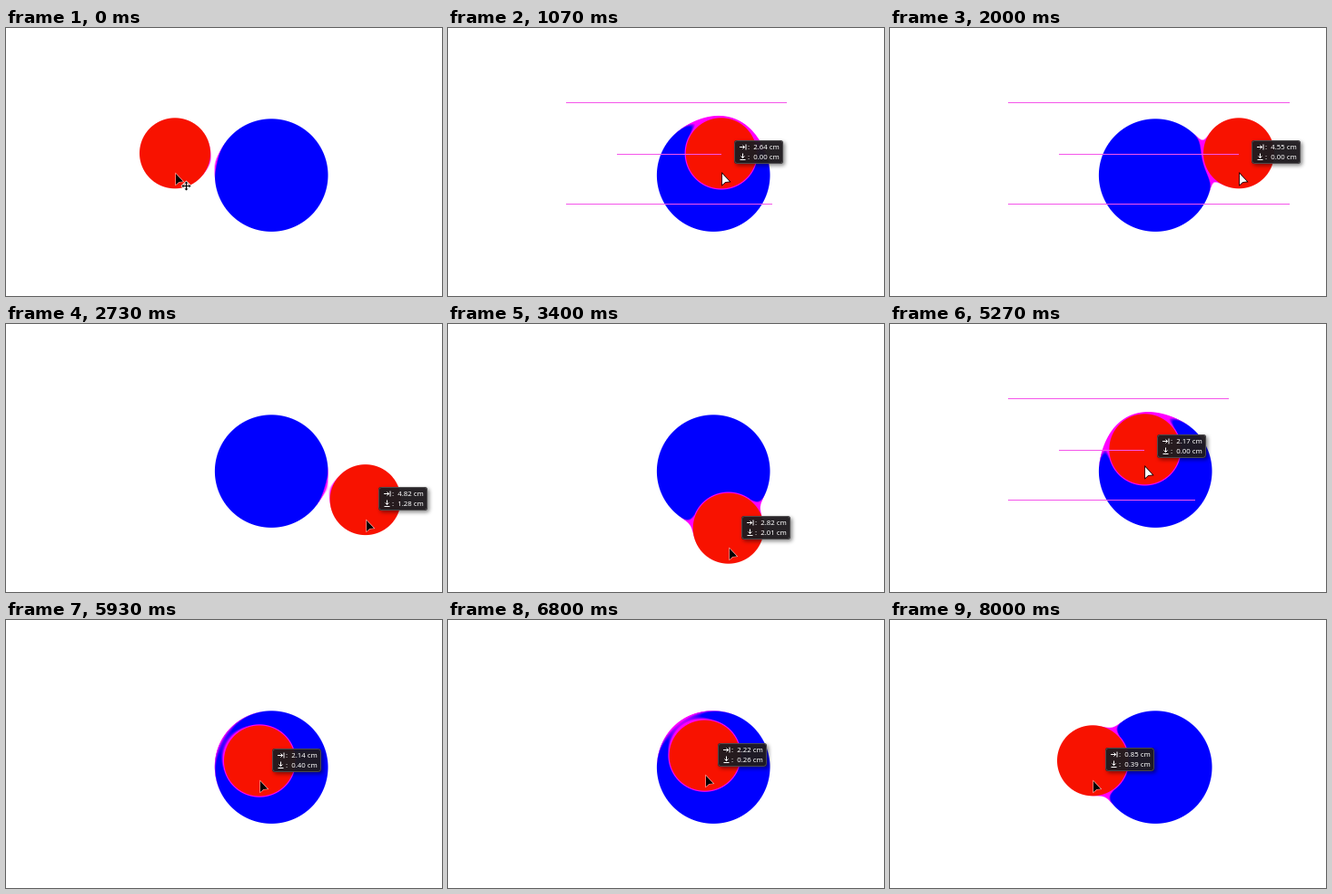
Animation of 480 by 296 pixels, one loop 8070 ms. Source, as an HTML page with a canvas:

```html
<!DOCTYPE html>
<html>
<head>
<meta charset="utf-8">
<style>
html, body { margin: 0; width: 480px; height: 296px; overflow: hidden; background: #fff; }
canvas { display: block; }
</style>
</head>
<body>
<canvas id="stage" width="480" height="296"></canvas>
<script>
const W = 480, H = 296, LOOP = 8070, STEPS = 121;
const ctx = document.getElementById('stage').getContext('2d');
const image = ctx.createImageData(W, H);

const WHITE = [255, 255, 255], BLUE = [0, 0, 255], RED = [248, 18, 0], MAGENTA = [255, 0, 255];
const HOME = { x: 186, y: 138.3, r: 39 };
const BALL = { x: 292.2, y: 162.6, r: 62.3 };
const PX_PER_CM = 43.5;
const EDGE = 56; // half size of the dragged layer, glow included

// key points of the drag: step, x, y
const PATH = [
  [0, 186, 138.3], [8, 240, 138.3], [30, 384, 138.3], [40, 397, 190],
  [51, 308.7, 225.7], [58, 240, 212], [64, 229.1, 165], [73, 246, 104],
  [79, 280.4, 135.5], [87, 286, 165], [91, 272, 146], [96, 272, 146],
  [102, 282.6, 149.6], [106, 288, 151], [120, 223, 155.3]
];

function slope(i, axis) {
  const a = PATH[i], b = PATH[i + 1];
  return a && b ? (b[axis] - a[axis]) / (b[0] - a[0]) : 0;
}

function tangent(i, axis) {
  const a = slope(i - 1, axis), b = slope(i, axis);
  return a * b <= 0 ? 0 : 2 * a * b / (a + b);
}

// monotone cubic through the key points
function along(step, axis) {
  let i = 0;
  while (i < PATH.length - 2 && PATH[i + 1][0] <= step) i++;
  const a = PATH[i], b = PATH[i + 1], span = b[0] - a[0];
  const u = (step - a[0]) / span, v = 1 - u;
  return a[axis] * v * v * (1 + 2 * u) + b[axis] * u * u * (3 - 2 * u) +
    span * (tangent(i, axis) * u * v * v - tangent(i + 1, axis) * u * u * v);
}

const clamp = v => Math.min(1, Math.max(0, v));
const cover = distance => clamp(.5 - distance);
const near = (a, b, reach) => Math.abs(a - b) < reach;

// two discs with a gooey bridge where their halos add up
function drawBalls(cx, cy) {
  for (let y = 0, n = 0; y < H; y++) {
    for (let x = 0; x < W; x++, n += 4) {
      const a = Math.hypot(x + .5 - cx, y + .5 - cy) - HOME.r;
      const b = Math.hypot(x + .5 - BALL.x, y + .5 - BALL.y) - BALL.r;
      const glow = Math.exp(-Math.max(a, 0) / 5) + Math.exp(-(b < 0 ? -.6 * b : b) / 5);
      const bridge = a < 16 ? clamp((glow - 1.09) * 5 + .5) : 0;
      const goo = Math.max(bridge, cover(a - 1.2) * cover(b));
      const blue = cover(b), red = cover(a);
      for (let c = 0; c < 3; c++) {
        let v = WHITE[c] + (BLUE[c] - WHITE[c]) * blue;
        v += (MAGENTA[c] - v) * goo;
        image.data[n + c] = v + (RED[c] - v) * red;
      }
      image.data[n + 3] = 255;
    }
  }
  ctx.putImageData(image, 0, 0);
}

function row(x1, x2, y) {
  ctx.fillStyle = '#f455ea';
  ctx.fillRect(x1, y, Math.round(x2 - x1), 1);
}

function column(x, y1, y2) {
  ctx.fillStyle = '#f455ea';
  ctx.fillRect(x, y1, 1, y2 - y1);
}

function drawGuides(x, y, level) {
  if (level) {
    row(HOME.x - EDGE, Math.max(373, x + EDGE), 82);
    row(HOME.x, x, 139);
    row(HOME.x - EDGE, x + EDGE, 194);
  }
  if (near(x, W / 2, 1.2)) column(W / 2, 0, H);
  if (near(x, BALL.x, 1.2)) column(292, 82, 243);
  if (near(y, H / 2, 1.2)) row(0, W, H / 2);
}

function shape(points, fill, stroke, width) {
  ctx.beginPath();
  points.forEach(([x, y]) => ctx.lineTo(x, y));
  ctx.closePath();
  ctx.lineWidth = width;
  ctx.strokeStyle = stroke;
  ctx.stroke();
  ctx.fillStyle = fill;
  ctx.fill();
}

function drawCursor(x, y, snapped, idle) {
  ctx.save();
  ctx.translate(Math.round(x), Math.round(y));
  const arrow = [[0, 0], [0, 12], [3.4, 9], [8, 8.6]];
  if (snapped) shape(arrow, '#fff', '#000', 1.5);
  else shape(arrow, '#000', 'rgba(255,255,255,.7)', 1.2);
  if (idle) {
    ctx.translate(11.5, 13.5);
    const arm = [[-.6, -.6], [-.6, -3], [-2, -3], [0, -5], [2, -3], [.6, -3]];
    const turn = ([x, y], k) => k ? turn([-y, x], k - 1) : [x, y];
    shape([0, 1, 2, 3].flatMap(k => arm.map(p => turn(p, k))), '#000', '#fff', 1.4);
  }
  ctx.restore();
}

function drawReadout(x, y, dx, dy) {
  ctx.save();
  ctx.translate(Math.round(x), Math.round(y));
  ctx.shadowColor = 'rgba(0,0,0,.5)';
  ctx.shadowBlur = 4;
  ctx.shadowOffsetX = ctx.shadowOffsetY = 2;
  ctx.fillStyle = 'rgba(32,28,32,.94)';
  ctx.beginPath();
  ctx.roundRect(0, 0, 54, 26, 3);
  ctx.fill();
  ctx.shadowColor = 'transparent';
  ctx.strokeStyle = 'rgba(120,120,120,.5)';
  ctx.lineWidth = 1;
  ctx.beginPath();
  ctx.roundRect(.5, .5, 53, 25, 3);
  ctx.stroke();

  ctx.strokeStyle = ctx.fillStyle = '#fff';
  ctx.stroke(new Path2D('M6 7.5H11.5M9.5 5.5L11.5 7.5L9.5 9.5M13 4.5V10.5M9.5 14.5V19.5M7.5 17.5L9.5 19.5L11.5 17.5M6.5 21.5H12.5'));
  ctx.font = '500 7.8px "Noto Sans", "Open Sans", sans-serif';
  [dx, dy].forEach((d, i) => {
    const base = 10.2 + i * 10.3;
    ctx.textAlign = 'left';
    ctx.fillText(':', 15, base);
    ctx.textAlign = 'right';
    ctx.fillText((d / PX_PER_CM).toFixed(2) + ' cm', 49.7, base);
  });
  ctx.restore();
}

function draw(step) {
  const x = along(step, 1), mouseY = along(step, 2);
  // the disc snaps to its starting height and to the big disc's centre
  const level = near(mouseY, HOME.y, 4), centred = near(mouseY, BALL.y, 2.8);
  const y = level ? HOME.y : centred ? BALL.y : mouseY;

  drawBalls(x, y);
  if (step) {
    drawGuides(x, y, level);
    drawReadout(x + 14, mouseY - 14, x - HOME.x, y - HOME.y);
  }
  drawCursor(x + 1, mouseY + 22.4, step && (level || centred), !step);
}

let shown = -1;
function tick() {
  const turn = performance.now() % LOOP / LOOP;
  const step = Math.floor(turn * STEPS + .1) % STEPS;
  if (step !== shown) draw(shown = step);
  requestAnimationFrame(tick);
}
tick();
</script>
</body>
</html>
```
